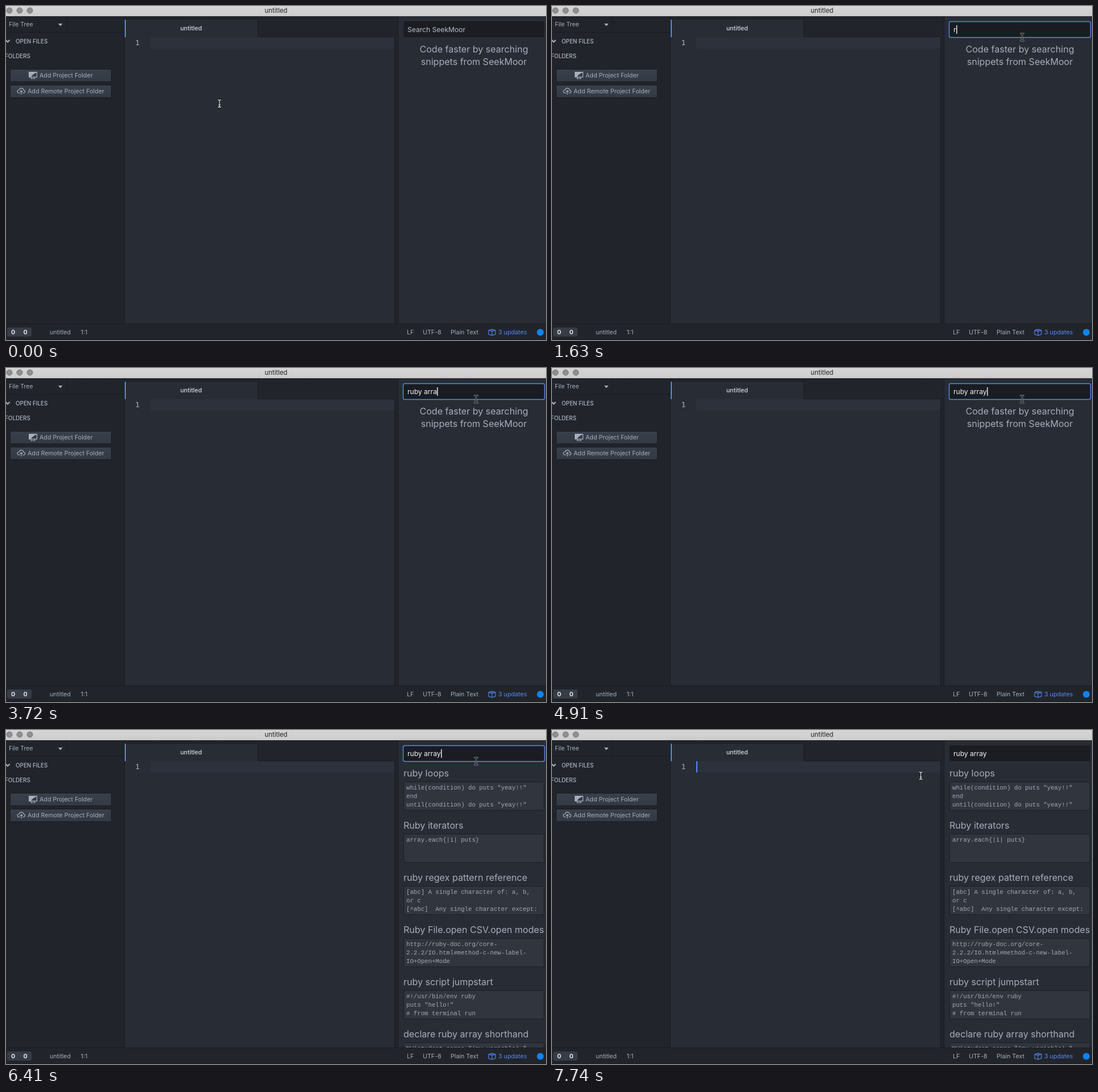
An HTML page for the animation above (8000 ms loop, 951 by 589 pixels).

```html
<!DOCTYPE html>
<html lang="en">
<head>
<meta charset="utf-8">
<title>Snippet search</title>
<style>
  html, body { margin: 0; width: 100%; height: 100%; overflow: hidden; background: #21252b; }
  svg { display: block; }
  text { font: 10.7px Inter, "Open Sans", sans-serif; fill: #a6aebd; white-space: pre; }
  .title { font-size: 11.4px; fill: #222; }
  .label { font-size: 9.9px; font-weight: 500; fill: #aeb6c4; }
  .small { font-size: 10.5px; }
  .tab { font-size: 10.6px; font-weight: 500; fill: #d7dae0; }
  .badge { font-weight: 700; fill: #e4e7ec; }
  .blue { fill: #568af2; }
  .num { font: 13px "DejaVu Sans Mono", monospace; fill: #abb2bf; }
  .field { font-size: 12.1px; }
  .head { font-size: 16.07px; }
  .code { font: 10.7px "Liberation Mono", "Courier New", monospace; fill: #a3aab6; }
  .mid { text-anchor: middle; }
  .line { stroke: #181a1f; fill: none; }
  .icon { stroke: #a6aebd; fill: none; stroke-width: 1.2; }
  .button { fill: url(#btn); stroke: #181a1f; }
  .beam { fill: none; stroke-linecap: round; }
  .beam .edge { stroke: #16181c; stroke-width: 2.6; }
  .beam .core { stroke: #f4f4f4; stroke-width: 1.1; }
  .dim .edge { stroke: #85888d; }
  .dim .core { stroke: #1d1f23; }
</style>
</head>
<body>
<svg width="951" height="589" viewBox="0 0 951 589">
  <defs>
    <linearGradient id="bar" x2="0" y2="1">
      <stop stop-color="#d6d6d6"/><stop offset="1" stop-color="#cdcdcd"/>
    </linearGradient>
    <linearGradient id="btn" x2="0" y2="1">
      <stop stop-color="#3a404b"/><stop offset="1" stop-color="#343a44"/>
    </linearGradient>
    <clipPath id="panel"><path d="M691 18H951V560H691z"/></clipPath>
    <path id="ibeam" d="M-2.7-6.5Q0-6.5 0-4.5V4.5Q0 6.5-2.7 6.5M2.7-6.5Q0-6.5 0-4.5M0 4.5Q0 6.5 2.7 6.5M-1.5 2.5H1.5"/>
  </defs>

  <rect width="951" height="589" fill="#21252b"/>
  <rect width="951" height="18" fill="url(#bar)"/>
  <g fill="#8f8f92" stroke="#77777a">
    <circle cx="6" cy="8" r="5"/><circle cx="24" cy="8" r="5"/><circle cx="42" cy="8" r="5"/>
  </g>
  <text class="title mid" x="475.5" y="12">untitled</text>

  <!-- file tree -->
  <path class="line" d="M106.5 18V46M0 46.5H208"/>
  <text class="small" x="5" y="36">File Tree</text>
  <path d="M92 31H99.500L95.750 35.500z" fill="#a6aebd"/>
  <path d="M-.5 60L3 63.500 6.500 60" fill="none" stroke="#aeb6c4" stroke-width="2"/>
  <text class="label" x="17" y="65.500">OPEN FILES</text>
  <text class="label" x="-2" y="92">FOLDERS</text>
  <rect class="button" x="7.500" y="111.500" width="178" height="22" rx="2"/>
  <rect class="button" x="7.500" y="139.500" width="178" height="22" rx="2"/>
  <path class="icon" d="M40.600 116.600H54.400V125.400H40.600zM45.500 125.500L44 128H51L49.500 125.500"/>
  <path d="M41 117H54Q47 120 44 125H41z" fill="#a6aebd"/>
  <text x="59" y="126">Add Project Folder</text>
  <path class="icon" d="M24.500 153.500H23Q20 153.300 20 150.500 20.200 148 23 148 24 144.800 27 144.800 30.500 145 31 148.300 33.500 148.800 33.500 151 33.300 153.500 30.800 153.500H29.500M27 156V149.500M24.500 151.500L27 149 29.500 151.500"/>
  <text x="38" y="154">Add Remote Project Folder</text>

  <!-- editor -->
  <rect x="209" y="55" width="475" height="505" fill="#282c34"/>
  <rect x="209" y="24" width="234" height="31" fill="#282c34"/>
  <path class="line" d="M208.500 18V560M209 23.500H443.500V54.500H684.500V560"/>
  <rect x="209" y="24" width="2" height="31" fill="#568af2"/>
  <text class="tab mid" x="326" y="43">untitled</text>
  <rect x="254" y="55" width="430" height="20" fill="#2c313c"/>
  <text class="num" x="227.500" y="69">1</text>
  <rect id="editCaret" x="254" y="55" width="2" height="20" fill="#528bff"/>

  <!-- search panel -->
  <rect x="691" y="18" width="260" height="542" fill="#282c34"/>
  <path class="line" d="M690.500 18V560"/>
  <rect x="700" y="27" width="248" height="28" rx="3" fill="#1b1d23"/>
  <rect id="focus" x="699.500" y="27.500" width="249" height="28" rx="3" fill="#1a1c21" stroke="#568af2" stroke-width="1.400"/>
  <text id="query" class="field" x="707" y="45.500"></text>
  <rect id="caret" y="34" width="1.500" height="15" fill="#e6e8ec"/>
  <g id="intro">
    <text class="head mid" x="824" y="81.500">Code faster by searching</text>
    <text class="head mid" x="824" y="103.500">snippets from SeekMoor</text>
  </g>
  <g id="results" clip-path="url(#panel)"></g>

  <!-- status bar -->
  <path class="line" d="M0 560.500H951M0 588.500H951"/>
  <rect x="2" y="567" width="43" height="16" rx="3" fill="#373c46"/>
  <text class="badge" x="9" y="579">0</text>
  <text class="badge" x="30.500" y="579">0</text>
  <text class="small" x="77" y="579">untitled</text>
  <text x="131.500" y="579">1:1</text>
  <text x="706" y="579">LF</text>
  <text x="734" y="579">UTF-8</text>
  <text x="783" y="579">Plain Text</text>
  <path d="M850 572L856 570 862 572V579L856 581 850 579zL856 574 862 572M856 574V581M853 571L859 573" fill="none" stroke="#568af2" stroke-width="1.100"/>
  <text class="blue" x="867" y="579">3 updates</text>
  <circle cx="941" cy="575.500" r="6" fill="#1083f5"/>

  <g id="beam" class="beam"><use href="#ibeam" class="edge"/><use href="#ibeam" class="core"/></g>
  <path id="arrow" d="M0 0V13.500L3.200 10.700 5.200 15.300 7.300 14.400 5.300 9.900H9.700z" fill="#0c0c0c" stroke="#f2f2f2" stroke-width="1.100"/>
</svg>

<script>
const LOOP = 8000;
const $ = id => document.getElementById(id);
const [editCaret, focusRing, query, caret, intro, results, beam, arrow] =
  ['editCaret', 'focus', 'query', 'caret', 'intro', 'results', 'beam', 'arrow'].map($);

const snippets = [
  ['ruby loops', 'while(condition) do puts "yeay!!"', 'end', 'until(condition) do puts "yeay!!"'],
  ['Ruby iterators', 'array.each{|i| puts}'],
  ['ruby regex pattern reference', '[abc] A single character of: a, b,', 'or c', '[^abc]  Any single character except:'],
  ['Ruby File.open CSV.open modes', 'http://ruby-doc.org/core-', '2.2.2/IO.html#method-c-new-label-', 'IO+Open+Mode'],
  ['ruby script jumpstart', '#!/usr/bin/env ruby', 'puts "hello!"', '# from terminal run'],
  ['declare ruby array shorthand', '%W(student names "(my variable) "'],
];

function add(tag, attrs, text = '') {
  const el = document.createElementNS('http://www.w3.org/2000/svg', tag);
  for (const key in attrs) el.setAttribute(key, attrs[key]);
  el.textContent = text;
  results.append(el);
}

snippets.forEach(([title, ...lines], i) => {
  const y = 92 * i;
  add('text', { class: 'head', x: 700, y: y + 81.5 }, title);
  add('rect', { x: 700.5, y: y + 91.5, width: 247, height: 50, rx: 2, fill: '#30353e', stroke: '#1b1e24' });
  lines.forEach((line, n) => add('text', { class: 'code', x: 705, y: y + 105 + 15 * n }, line));
});

// Each track lists [start time, value...]; values hold until the next entry.
const phrase = 'ruby array';
const keyTimes = [1630, 2230, 2670, 2820, 2970, 3270, 3420, 3720, 3860];
const lengths = [1, 2, 3, 4, 5, 6, 7, 9, 10];
const typing = [[0, 0], ...keyTimes.map((t, i) => [t, lengths[i]])];
const searchBlink = [[0, 0], [1180, 1], [4460, 0], [4910, 1], [5960, 0], [6410, 1], [7010, 0], [7450, 1], [7740, 0]];
const editBlink = [[0, 0], [300, 1], [740, 0], [7740, 1]];
const pointer = [
  [0, 376, 172], [600, 396, 168], [740, 560, 130], [890, 760, 72], [1040, 828, 55],
  [7010, 820, 56], [7160, 770, 61], [7300, 697, 70], [7450, 664, 78], [7600, 649.5, 80.5],
];

const at = (track, t) => track.findLast(step => step[0] <= t).slice(1);
const show = (el, on) => { el.style.display = on ? '' : 'none'; };

function draw(t) {
  const typed = phrase.slice(0, at(typing, t)[0]);
  query.textContent = typed || 'Search SeekMoor';
  query.style.fill = typed ? '#f0f2f5' : '#b9bec8';
  caret.setAttribute('x', 707 + (typed ? Math.round(query.getComputedTextLength()) : 0));
  show(caret, at(searchBlink, t)[0]);
  show(editCaret, at(editBlink, t)[0]);
  show(focusRing, t >= 1180 && t < 7740);
  show(intro, t < 5510);
  show(results, t >= 5510);

  const [x, y] = at(pointer, t);
  const onDivider = x > 684 && x < 700;
  show(arrow, onDivider);
  show(beam, !onDivider);
  beam.classList.toggle('dim', x > 700);
  for (const el of [beam, arrow]) el.setAttribute('transform', `translate(${x} ${y})`);
}

const start = performance.now();
function tick() {
  draw((performance.now() - start) % LOOP);
  requestAnimationFrame(tick);
}
tick();
</script>
</body>
</html>
```
